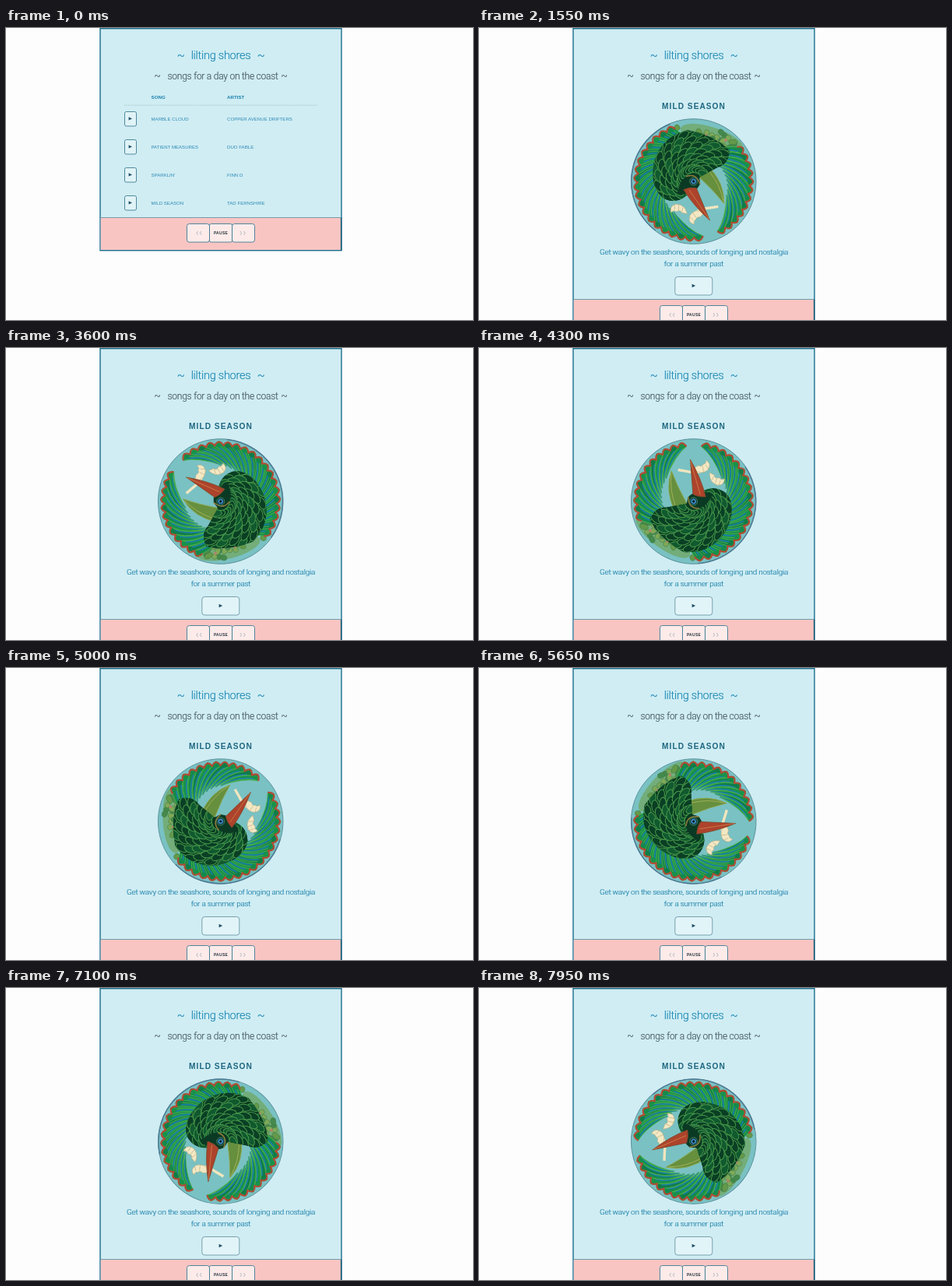
Animation of 600x375 px, one loop 8000 ms. Source, as an HTML page:

```html
<!DOCTYPE html>
<html lang="en">
<head>
<meta charset="utf-8">
<title>Playlist</title>
<style>
  html, body { margin: 0; width: 100%; height: 100%; overflow: hidden; background: #fefdfe; }
  svg { display: block; width: 600px; height: 375px; }
  text { font-family: "Liberation Sans", Arial, sans-serif; fill: #2a88b4; white-space: pre; }
  .light { font-family: Roboto, "Open Sans", sans-serif; font-weight: 300; letter-spacing: -.02em; text-anchor: middle; stroke-width: .15; }
  .title { font-size: 14.6px; fill: #1785b2; stroke: #1785b2; }
  .sub { font-size: 12px; fill: #43555f; stroke: #43555f; }
  .note { font-size: 9.9px; fill: #177ea9; stroke: #177ea9; }
  .row { font-size: 6.1px; }
  .head { font-size: 6.2px; font-weight: 700; fill: #1b80ac; }
  .song { font-size: 10.2px; font-weight: 700; letter-spacing: 1px; fill: #1d6680; text-anchor: middle; }
  .pause { font-size: 4.9px; font-weight: 700; letter-spacing: .35px; fill: #26343c; text-anchor: middle; }
  .btn { fill: #fff; fill-opacity: .65; stroke: #3f7d94; stroke-width: .9; }
  .list .btn, .detail > .btn { fill-opacity: .35; }
  .detail > .btn { stroke: #6f98a6; }
  .tri { fill: #1f4f66; }
  .chev { fill: none; stroke: #8d9fa9; stroke-width: .7; }
</style>
</head>
<body>
<svg viewBox="0 0 600 375">
  <rect id="panel" x="121" y=".7" width="310" fill="#d0edf3" stroke="#1a6d8b" stroke-width="1.4"/>
  <g id="footer">
    <rect x="121.7" y="0" width="308.6" height="41.4" fill="#f9c5c3"/>
    <path d="M121.7 0H430" stroke="#5b8c9e" stroke-width=".8"/>
    <path d="M430.6 0V42" stroke="#1a5f7a" stroke-width="1.4"/>
    <rect class="btn" x="232.5" y="8" width="29" height="23.5" rx="3"/>
    <rect class="btn" x="261.5" y="8" width="29" height="23.5" rx="2"/>
    <rect class="btn" x="290.5" y="8" width="29" height="23.5" rx="3"/>
    <path class="chev" d="M246.5 17.5l-1.6 2.4 1.6 2.4M251 17.5l-1.6 2.4 1.6 2.4M301 17.5l1.6 2.4-1.6 2.4M305.5 17.5l1.6 2.4-1.6 2.4"/>
    <text class="pause" x="276" y="21.7">PAUSE</text>
  </g>

  <text class="light title" x="276" y="40">lilting shores</text>
  <text class="light title" x="224.5" y="40">~</text>
  <text class="light title" x="327.5" y="40">~</text>
  <text class="light sub" x="278.6" y="66">songs for a day on the coast</text>
  <text class="light sub" x="194.5" y="66">~</text>
  <text class="light sub" x="357.5" y="66">~</text>

  <g class="list" id="list">
    <text class="head" x="186.5" y="91.3">SONG</text>
    <text class="head" x="284" y="91.3">ARTIST</text>
    <path d="M152 99.2H400" stroke="#a3bdc4" stroke-width=".8" stroke-dasharray="1 .7"/>
  </g>

  <g class="detail" id="detail">
    <text class="song" x="276" y="103.8">MILD SEASON</text>
    <g id="disc"></g>
    <text class="light note" x="276" y="291.3">Get wavy on the seashore, sounds of longing and nostalgia</text>
    <text class="light note" x="276" y="305.6">for a summer past</text>
    <rect class="btn" x="251.8" y="319.5" width="48" height="23.5" rx="3.5"/>
    <path class="tri" d="M273.6 328.8l4.6 2.2-4.6 2.2z"/>
  </g>
</svg>
<script>
const LOOP = 8000, STEP = 50, OPEN = 1200;
const TURN = 360 / 5000;      // degrees per ms
const UPRIGHT = 6300;         // time at which the disc is drawn unrotated
const $ = id => document.getElementById(id);

function add(parent, tag, attrs, text) {
  const el = document.createElementNS(parent.namespaceURI, tag);
  for (const k in attrs) el.setAttribute(k, attrs[k]);
  if (text) el.textContent = text;
  return parent.appendChild(el);
}

// Song list
const songs = [
  ["MARBLE CLOUD", "COPPER AVENUE DRIFTERS"],
  ["PATIENT MEASURES", "DUO FABLE"],
  ["SPARKLIN'", "FINN D"],
  ["MILD SEASON", "TAD FERNSHIRE"]
];
const names = songs.map(([song, artist], i) => {
  const y = 117 + 36 * i, list = $("list");
  add(list, "rect", { class: "btn", x: 152.5, y: y - 9.5, width: 15, height: 18.5, rx: 2 });
  add(list, "path", { class: "tri", d: `M157.6 ${y - 2.8}l4.4 2.2-4.4 2.2z` });
  add(list, "text", { class: "row", x: 284, y: y + 2.2 }, artist);
  return add(list, "text", { class: "row", x: 186.5, y: y + 2.2 }, song);
});

// Disc with the bird
const disc = $("disc");
const path = (d, attrs, parent = disc) => add(parent, "path", { d, ...attrs });
const mix = (a, b, u) => a + (b - a) * u;
const P = (r, deg) => {
  const a = deg * Math.PI / 180;
  return `${(r * Math.cos(a)).toFixed(1)} ${(r * Math.sin(a)).toFixed(1)}`;
};

let seed = 7;
const rnd = () => (seed = seed * 16807 % 2147483647) / 2147483647;

function feather(a, lean, root, w, fill) {
  const mid = (root + 75) / 2 + 3, base = P(root, a + lean);
  const side = s => P(mid, a + lean * .42 + s * w * 1.2);
  const line = (d, stroke, width) => path(d, { fill: "none", stroke, "stroke-width": width });
  path(`M${base}Q${side(-1)} ${P(71, a - w)}L${P(77.5, a)}L${P(71, a + w)}Q${side(1)} ${base}Z`,
    { fill, stroke: "#49b04c", "stroke-width": .9 });
  line(`M${base}Q${side(0)} ${P(69, a)}`, "#1b80a8", 1.7);
  line(`M${base}Q${side(.5)} ${P(70, a + w * .5)}`, "#5fba4a", .7);
  line(`M${P(71, a - w)}Q${P(76, a - w * .6)} ${P(76.5, a)}Q${P(76, a + w * .6)} ${P(71, a + w)}`, "#b04a33", 2.1);
}

function wing(from, to, count, lean, root, tipRoot) {
  const fills = ["#148a4c", "#0f7d48", "#17924a"];
  for (let i = 0; i < count; i++) {
    const u = i / (count - 1);
    feather(mix(from, to, u), lean, mix(root, tipRoot, u), Math.abs(to - from) / count / 2 + .6, fills[i % 3]);
  }
}

add(disc, "circle", { r: 80.3, fill: "#79c1c3", stroke: "#5a8f9a", "stroke-width": .9 });
path(`M${P(79.8, 110)}A79.8 79.8 0 0 1 ${P(79.8, 230)}`, { fill: "none", stroke: "#4c7894", "stroke-width": 1.3 });

// Leaves and blossoms at the crown
add(disc, "ellipse", { cx: 5, cy: -60, rx: 42, ry: 14, fill: "#6fa65c", "fill-opacity": .7 });
for (let i = 0; i < 26; i++) {
  const a = mix(-125, -55, rnd()), r = mix(52, 74, rnd());
  add(disc, "ellipse", {
    rx: mix(3, 6, rnd()), ry: 3.4, transform: `translate(${P(r, a)}) rotate(${rnd() * 180})`,
    fill: ["#64994a", "#45894c", "#7fa958"][i % 3], stroke: "#3d7a44", "stroke-width": .5
  });
}
for (const [x, y] of [[-3, -61], [14, -57], [23, -63]])
  add(disc, "circle", { cx: x, cy: y, r: 1.8, fill: "#b9826b" });

wing(228, 67, 19, 38, 26, 47);
wing(-52, 42, 12, -38, 33, 46);

// Olive plume, cream curls
path("M10-25Q38-12 46 15Q28 3 6-7Z", { fill: "#668f3e", stroke: "#8fa84c", "stroke-width": .8 });
path("M16-18Q34-6 44 12", { fill: "none", stroke: "#a9b65a", "stroke-width": .8 });
path("M40 21L30 26Q20 30 14 38", { fill: "none", stroke: "#f0e5be", "stroke-width": 3.4 });
const cream = { fill: "#f3e8c4", stroke: "#b9aa7c", "stroke-width": .5 };
path("M5 42Q-2 31-13 35Q-20 40-15 47Q-13 42-9 44Q-5 39-2 43Z", cream);
path("M26 33Q12 32 9 43Q9 53 18 52Q15 48 18 46Q17 42 22 41Z", cream);
path("M-14 36L-12 42M-9 34L-7 41M-3 36L-2 42M11 38L17 43M9 45L15 47", { stroke: "#b9aa7c", "stroke-width": .6 });

// Body with scales
const bodyShape = "M32-52Q5-65-28-60Q-57-42-56-8Q-51 27-28 33Q-10 34-2 18Q8 8 6-8Q15-18 23-26Q36-34 32-52Z";
path(bodyShape, {}, add(disc, "clipPath", { id: "body" }));
path(bodyShape, { fill: "#0a3a20" });
const scales = add(disc, "g", { "clip-path": "url(#body)" });
for (let row = 0; row < 8; row++) {
  for (let col = 0; col < 12; col++) {
    const r = 68 - row * 7.4, a = 112 + (col + row % 2 / 2) * 17;
    add(scales, "ellipse", {
      rx: 8, ry: 4.3, transform: `translate(${P(r, a)}) rotate(${a + 65})`,
      fill: (row + col) % 3 ? "#0a3f24" : "#11592f", stroke: "#46984a", "stroke-width": 1
    });
  }
}

// Head and beak
path("M-15 20Q-18 2-7-8Q6-12 9 1Q7 13-3 17Q-9 22-15 20Z", { fill: "#0b3a24" });
path("M-9 14Q-2 8 6 7L35 41Q10 30-9 14Z", { fill: "#ad432c", stroke: "#7d4a2b", "stroke-width": .8 });
path("M-2 12L34 40", { stroke: "#d08a4c", "stroke-width": .7 });
path("M-11-3Q0-12 9 1", { fill: "none", stroke: "#8f7a3c", "stroke-width": 1.6 });
add(disc, "circle", { r: 5, fill: "#123a4c", stroke: "#4a8f5a", "stroke-width": .8 });
add(disc, "circle", { r: 3.2, fill: "#3f8fc4" });
add(disc, "circle", { r: 1.6, fill: "#0a1d28" });

// Hover strength over time: [ms, value] pairs
const hovers = [
  [names[2], [[0, 0], [499, 0], [600, 1], [700, 1], [800, 0]]],
  [names[3], [[0, 0], [700, 0], [900, 1]]]
];
function level(keys, t) {
  const i = keys.findIndex(k => k[0] > t);
  if (i < 0) return keys[keys.length - 1][1];
  const [t0, a] = keys[i - 1], [t1, b] = keys[i];
  return mix(a, b, (t - t0) / (t1 - t0));
}
const tint = u => `rgb(${mix(42, 28, u)},${mix(136, 84, u)},${mix(180, 112, u)})`;

function draw(now) {
  const t = Math.floor((now % LOOP) / STEP) * STEP, open = t >= OPEN;
  $("list").style.display = open ? "none" : "";
  $("detail").style.display = open ? "" : "none";
  $("panel").setAttribute("height", open ? 420 : 285);
  $("footer").setAttribute("transform", `translate(0 ${open ? 348.5 : 243.5})`);
  for (const [el, keys] of hovers) el.style.fill = tint(level(keys, t));
  disc.setAttribute("transform", `translate(275.7 197) rotate(${(t - UPRIGHT) * TURN})`);
}

const start = performance.now();
function tick() {
  draw(performance.now() - start);
  requestAnimationFrame(tick);
}
tick();
</script>
</body>
</html>
```
